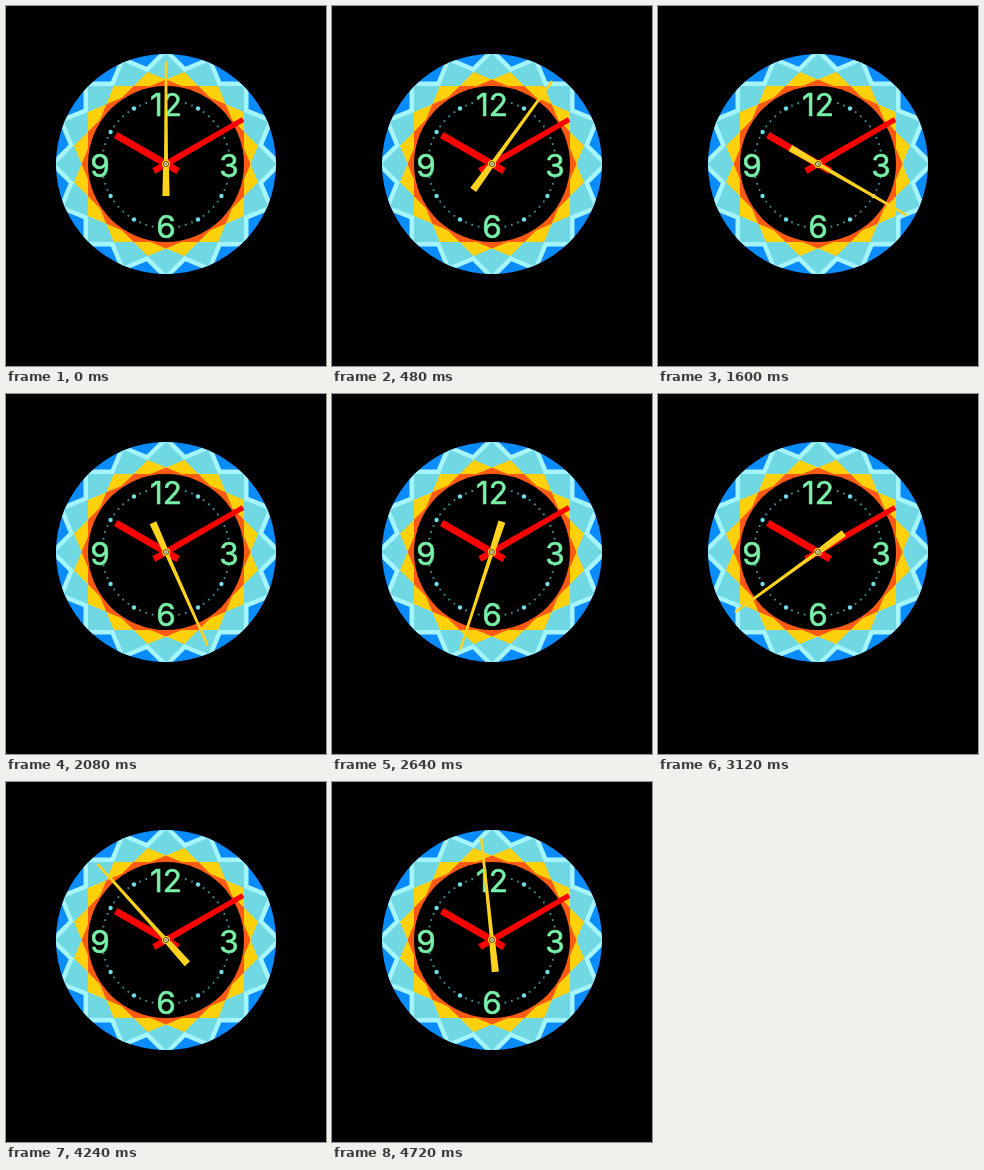
Write an HTML page with a canvas that moves like this. It is 320 by 360 pixels and loops after 4.8 s.

```html
<!DOCTYPE html>
<html>
<head>
<meta charset="utf-8">
<style>
  html, body { margin: 0; width: 100%; height: 100%; overflow: hidden; background: #000; }
  canvas { display: block; }
</style>
</head>
<body>
<canvas id="clock" width="320" height="360"></canvas>
<script>
const ctx = document.getElementById('clock').getContext('2d');
const LOOP = 4800, TICK = 80, TAU = Math.PI * 2;
const RIM = 110, FACE = 78, POINTS = 16;

function disc(x, y, r, color) {
  ctx.fillStyle = color;
  ctx.beginPath();
  ctx.arc(x, y, r, 0, TAU);
  ctx.fill();
}

function polygon(points, color) {
  ctx.fillStyle = color;
  ctx.beginPath();
  for (const [x, y] of points) ctx.lineTo(x, y);
  ctx.closePath();
  ctx.fill();
}

// Outline of the k-th layer of four overlapping rotated squares.
function star(apothem, k, color) {
  const points = [];
  for (let i = 0; i < POINTS * 2; i++) {
    const angle = i * TAU / (POINTS * 2);
    const order = i % 2 === k % 2 ? k : k - 1;
    const r = apothem / Math.cos(order * Math.PI / POINTS);
    points.push([r * Math.sin(angle), -r * Math.cos(angle)]);
  }
  polygon(points, color);
}

function drawRim() {
  ctx.save();
  ctx.beginPath();
  ctx.arc(0, 0, RIM, 0, TAU);
  ctx.clip();
  disc(0, 0, RIM + 1, '#0a8cff');
  star(FACE + 4.5, 4, '#a5f5ff');
  star(FACE, 4, '#6fd8e2');
  star(FACE, 3, '#ffd10a');
  star(FACE, 2, '#ff5a14');
  ctx.restore();
  disc(0, 0, FACE, '#000');
}

function drawDial() {
  for (let minute = 0; minute < 60; minute++) {
    const fromQuarter = Math.min(minute % 15, 15 - minute % 15);
    const gap = minute < 5 || minute > 55 ? 2 : 1;
    if (fromQuarter <= gap) continue;
    const angle = minute * TAU / 60;
    const isHour = minute % 5 === 0;
    disc(64 * Math.sin(angle), -64 * Math.cos(angle),
      isHour ? 2.2 : 1.1, isHour ? '#72dce6' : '#3f858c');
  }
  ctx.font = '400 31.5px Inter, sans-serif';
  ctx.textAlign = 'center';
  ctx.fillStyle = ctx.strokeStyle = '#78f0a8';
  ctx.lineWidth = 0.6;
  ctx.lineJoin = 'round';
  for (const [label, x, y] of [['12', 0, -48], ['3', 63, 13], ['6', 0, 74], ['9', -66, 13]]) {
    ctx.fillText(label, x, y);
    ctx.strokeText(label, x, y);
  }
}

function hand(degrees, color, points) {
  ctx.save();
  ctx.rotate(degrees * TAU / 360);
  const mirrored = points.map(([x, y]) => [-x, y]).reverse();
  polygon([...points, ...mirrored], color);
  ctx.restore();
}

function draw(now) {
  const tick = Math.floor(now % LOOP / TICK);
  ctx.setTransform(1, 0, 0, 1, 0, 0);
  ctx.fillStyle = '#000';
  ctx.fillRect(0, 0, 320, 360);
  ctx.translate(160, 158);
  drawRim();
  drawDial();
  hand(300, '#f00', [[3.5, -58], [3.5, 14]]);
  hand(60, '#f00', [[2.6, -89], [3.2, 14]]);
  hand(tick * 6, '#ffd21e', [[1.2, -102.5], [2, 0], [3, 5], [3.6, 32]]);
  disc(0, 0, 4, '#ffd21e');
  disc(0, 0, 2.8, '#3a3010');
  disc(0, 0, 2, '#fff0b0');
  disc(0, 0, 0.8, '#222');
}

function frame() {
  draw(performance.now());
  requestAnimationFrame(frame);
}
frame();
</script>
</body>
</html>
```
